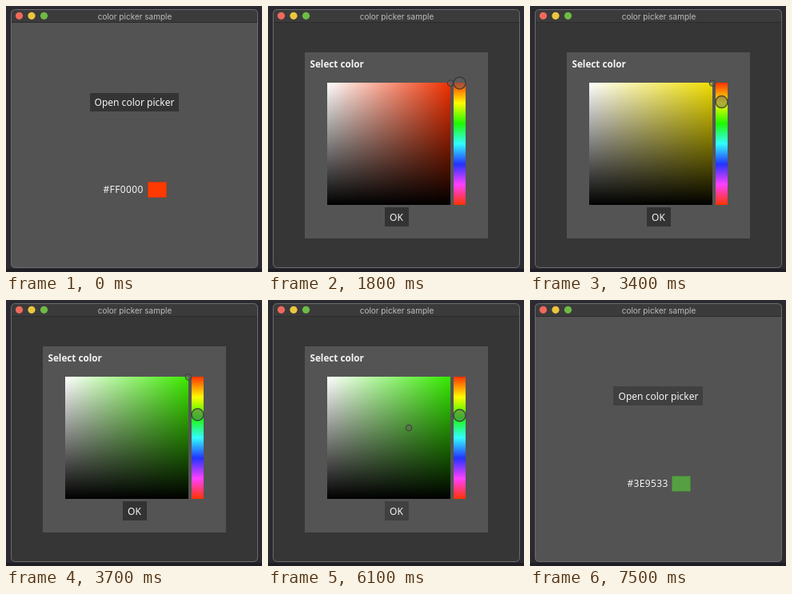
Recreate the animation shown at these times as an HTML page with a canvas. Size 320x333 px, loop 8000 ms.

```html
<!DOCTYPE html>
<html lang="en">
<head>
<meta charset="utf-8">
<title>Color picker sample</title>
<style>
html, body { margin: 0; width: 100%; height: 100%; overflow: hidden; background: #2b2a30; }
canvas { display: block; }
</style>
</head>
<body>
<canvas id="stage" width="320" height="333"></canvas>
<script>
const ctx = document.getElementById('stage').getContext('2d');
const LOOP = 8000;
const HOVER = [1400, 7500];
const DIALOG_OPEN = 1700, DIALOG_CLOSE = 6200, OK_HOVER = 5800;
const AREA = { x: 74, y: 96, w: 154, h: 153 };
const STRIP = { x: 232, y: 96, w: 15, h: 153 };
const HUES = [[255, 51, 0], [255, 251, 0], [30, 249, 0], [50, 253, 255],
              [35, 51, 255], [255, 64, 255], [255, 51, 0]];

// Waypoints: [time, value, ...]
const HUE_PATH = [[2600, 96.5], [2850, 122], [3100, 96.5], [3700, 143.5], [4000, 158], [4300, 144.5]];
const SHADE_PATH = [[4550, 228, 96.5], [5100, 187, 157], [5400, 176, 160]];

const rgb = c => `rgb(${c.map(Math.round)})`;
const mix = (a, b, t) => a.map((v, i) => v + (b[i] - v) * t);

function follow(path, time) {
  const next = path.findIndex(p => p[0] > time);
  if (next === 0) return path[0].slice(1);
  if (next < 0) return path[path.length - 1].slice(1);
  const a = path[next - 1], b = path[next];
  const t = (time - a[0]) / (b[0] - a[0]);
  return mix(a.slice(1), b.slice(1), t * t * (3 - 2 * t));
}

function hueColor(y) {
  const pos = Math.min(Math.max((y - STRIP.y - 0.5) / STRIP.h, 0), 0.999) * 6;
  const i = Math.floor(pos);
  return mix(HUES[i], HUES[i + 1], pos - i);
}

function box(x, y, w, h, fill) {
  ctx.fillStyle = fill;
  ctx.fillRect(x, y, w, h);
}

function gradientBox({ x, y, w, h }, stops, horizontal) {
  const g = ctx.createLinearGradient(x, y, horizontal ? x + w : x, horizontal ? y : y + h);
  stops.forEach((c, i) => g.addColorStop(i / (stops.length - 1), c));
  box(x, y, w, h, g);
}

function disc(x, y, r, fill, stroke, width = 1) {
  ctx.beginPath();
  ctx.arc(x, y, r, 0, Math.PI * 2);
  ctx.fillStyle = fill;
  ctx.fill();
  if (!stroke) return;
  ctx.strokeStyle = stroke;
  ctx.lineWidth = width;
  ctx.stroke();
}

function text(str, x, y, { font = '12px "Noto Sans", sans-serif', color = '#f4f4f4',
                           align = 'left', spacing = 0 } = {}) {
  ctx.font = font;
  ctx.textAlign = align;
  ctx.letterSpacing = spacing + 'px';
  ctx.fillStyle = color;
  ctx.fillText(str, x, y);
}

function drawWindow(dimmed) {
  box(0, 0, 320, 333, '#2b2a30');
  box(0, 329, 320, 4, '#1f1e24');
  ctx.save();
  ctx.beginPath();
  ctx.roundRect(6, 4, 309, 324, 5);
  ctx.clip();
  box(6, 4, 309, 324, dimmed ? '#363636' : '#535353');
  box(6, 4, 309, 16, '#3c3b3b');
  box(6, 20, 309, 1, '#2a2a2a');
  ctx.restore();
  ctx.beginPath();
  ctx.roundRect(6.5, 4.5, 308, 323, 5);
  ctx.strokeStyle = '#6b6b6d';
  ctx.lineWidth = 1;
  ctx.stroke();
  ['#f0695c', '#ebc63f', '#6dbb46'].forEach((c, i) => disc(16.5 + i * 15.5, 12.3, 4.6, c));
  text('color picker sample', 161, 16.5,
       { font: '10px Inter, sans-serif', color: '#bdbdbd', align: 'center' });
}

function drawMain(hovered, picked) {
  if (hovered) box(104, 108, 112, 24, '#404040');
  else box(105, 109, 111, 23, '#343434');
  text('Open color picker', 160.5, 125, { align: 'center' });
  text(picked ? '#3E9533' : '#FF0000', 121.5, 234, { spacing: 0.35 });
  box(177, 220, 24, 20, picked ? '#4a7f3d' : '#c23a12');
  box(178, 221, 22, 18, picked ? '#56a043' : '#ff3a00');
}

function drawDialog(time) {
  box(46, 58, 229, 233, '#545454');
  text('Select color', 52.5, 77, { font: 'bold 11.7px "Noto Sans", sans-serif' });

  const [hueY] = follow(HUE_PATH, time);
  const [shadeX, shadeY] = follow(SHADE_PATH, time);
  const pure = hueColor(hueY).map(v => v * 0.94);
  gradientBox(AREA, ['#fff', rgb(pure)], true);
  gradientBox(AREA, ['rgba(0,0,0,0)', '#000'], false);
  gradientBox(STRIP, HUES.map(rgb), false);

  disc(shadeX, shadeY, 3.7, 'rgba(100,100,100,.5)', 'rgba(60,60,60,.85)', 1.2);
  disc(239.5, hueY, 7.5, 'rgba(100,100,100,.5)', 'rgba(50,50,50,.8)', 1.5);

  box(146, 252, 30, 24, time >= OK_HOVER ? '#404040' : '#333');
  text('OK', 160.5, 269, { align: 'center' });
}

function draw(now) {
  const time = now % LOOP;
  const open = time >= DIALOG_OPEN && time < DIALOG_CLOSE;
  drawWindow(open);
  if (open) {
    drawDialog(time);
  } else {
    const picked = time >= DIALOG_CLOSE;
    drawMain(time >= HOVER[picked ? 1 : 0], picked);
  }
}

const start = performance.now();
function tick() {
  draw(performance.now() - start);
  requestAnimationFrame(tick);
}
tick();
</script>
</body>
</html>
```
